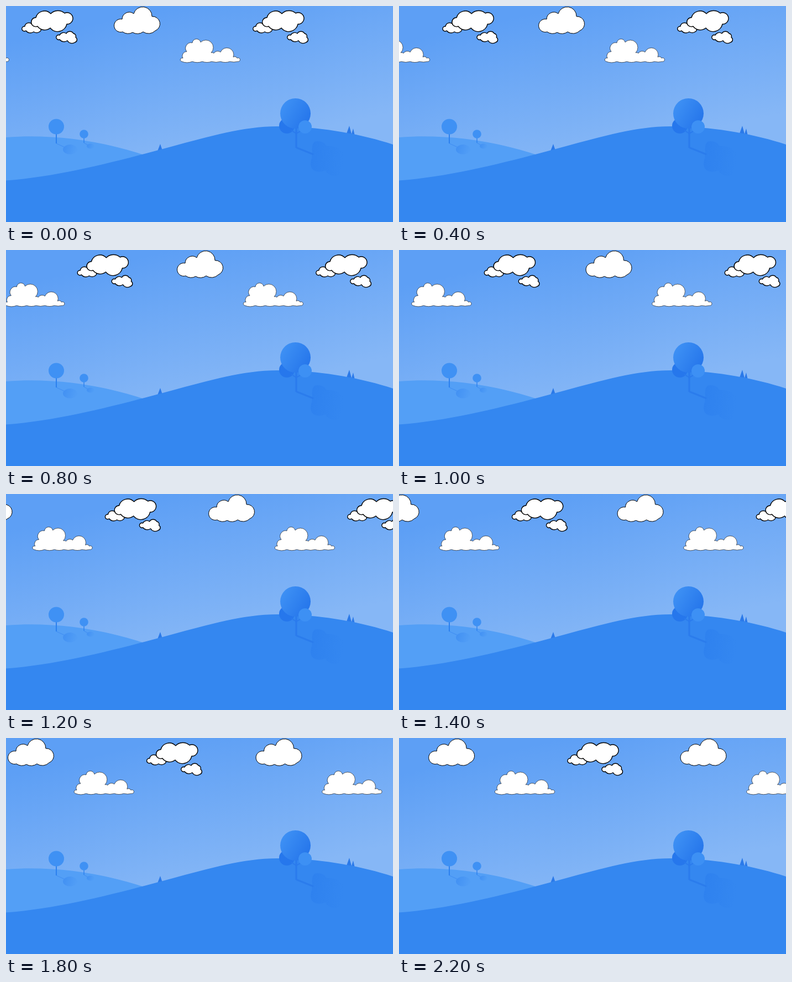
Write an HTML page that moves like this. It is 700 by 393 pixels and loops after 2.4 s.

```html
<!DOCTYPE html>
<html lang="en">
<head>
<meta charset="utf-8">
<title>Drifting clouds</title>
<style>
  html, body { margin: 0; width: 100%; height: 100%; overflow: hidden; }
  svg { display: block; width: 100vw; height: 100vh; }
</style>
</head>
<body>
<svg viewBox="0 0 700 393" preserveAspectRatio="none">
  <defs>
    <linearGradient id="sky" gradientUnits="userSpaceOnUse" x1="300" y1="0" x2="360" y2="270">
      <stop stop-color="#5d9ff5"/><stop offset="1" stop-color="#86b7f6"/>
    </linearGradient>
    <linearGradient id="crown" x1="0" y1=".2" x2="1" y2=".8">
      <stop stop-color="#3f92f5"/><stop offset="1" stop-color="#2474ea"/>
    </linearGradient>
    <linearGradient id="shade" x1="0" y1="0" x2="1" y2=".1">
      <stop stop-color="#2b7eee"/><stop offset="1" stop-color="#2b7eee" stop-opacity="0"/>
    </linearGradient>
    <linearGradient id="farShade" x1="0" y1="0" x2="1" y2=".2">
      <stop stop-color="#4190f3"/><stop offset="1" stop-color="#4190f3" stop-opacity=".1"/>
    </linearGradient>

    <g id="clouds" fill="#fff" stroke="#000" stroke-linejoin="round">
      <g stroke-width="1.4">
        <path d="M34 37A7.5 7.5 0 0 1 47 33A10 10 0 0 1 61 38A5 5 0 0 1 62 46A10 10 0 0 1 50 47A10 10 0 0 1 36 45A4.5 4.5 0 1 1 34 37Z"/>
        <path d="M54 21A16 16 0 0 1 81 14A18 18 0 0 1 106 13A10.5 10.5 0 1 1 110 33A17 17 0 0 1 80 40A16 16 0 0 1 57 37A8.3 8.3 0 1 1 54 21Z"/>
        <path d="M97 53A8 8 0 0 1 109 50A7.5 7.5 0 0 1 122 50A5 5 0 0 1 126 57A5 5 0 0 1 125 66A9.5 9.5 0 0 1 111 63A10 10 0 0 1 97 61A4.4 4.4 0 1 1 97 53Z"/>
      </g>
      <path d="M210 24A13 13 0 0 1 231 14A16.8 16.8 0 0 1 264 19A13.5 13.5 0 0 1 270 45A17 17 0 0 1 248 47A16.7 16.7 0 0 1 229 48A16 16 0 0 1 211 47A11.9 11.9 0 1 1 210 24Z"/>
      <path stroke-width=".6" d="M318 101A3.2 3.2 0 1 1 320 95A8 8 0 0 1 327 83A10 10 0 0 1 337 67A7.6 7.6 0 0 1 352 66A12.9 12.9 0 0 1 371 85A5 5 0 0 1 376 86A8 8 0 0 1 388 84A12.3 12.3 0 0 1 411 93A4.5 4.5 0 0 1 418 95A3.4 3.4 0 1 1 419 101A25 25 0 0 1 405 101A25 25 0 0 1 388 101A25 25 0 0 1 372 101A25 25 0 0 1 355 101A25 25 0 0 1 337 101A25 25 0 0 1 318 101Z"/>
    </g>
  </defs>

  <path fill="url(#sky)" d="M0 0H700V393H0Z"/>
  <use id="near" href="#clouds"/>
  <use id="far" href="#clouds"/>

  <path fill="#539ff6" d="M0 239C80 233 165 243 250 271V330H0Z"/>
  <ellipse cx="116" cy="261" rx="13" ry="9" fill="url(#farShade)"/>
  <ellipse cx="153" cy="255" rx="7" ry="4.5" fill="url(#farShade)"/>
  <path fill="none" stroke="#4391f3" stroke-width="1.3" d="M91 250L106 257M141 249L148 253"/>
  <path stroke="#2b80ee" stroke-width="2" d="M91 230V250"/>
  <path stroke="#2b80ee" stroke-width="1.4" d="M141 239V249"/>
  <g fill="#3f91f4">
    <circle cx="91" cy="219.5" r="14"/>
    <circle cx="141" cy="233" r="7.8"/>
  </g>

  <path fill="#2a79e9" d="M274 264L279 251L283 263ZM616 232L621 218L625 233ZM625 233L628 223L630.500 234Z"/>
  <path fill="#3487f0" d="M0 317.500C95 310 190 285 280 261C355 241 425 219 490 219C565 219 640 232 700 252V393H0Z"/>

  <path fill="url(#shade)" opacity=".65" d="M554 268C552 252 556 244 566 246C574 247 577 250 580 255C596 254 612 261 613 277C614 296 608 310 594 309C586 309 581 304 577 299C565 305 552 300 551 289C551 281 554 275 554 268Z"/>
  <path fill="none" stroke="#2b7cec" stroke-width="3" d="M525 257.500L556 270"/>
  <circle cx="508" cy="218" r="14" fill="#2677ec"/>
  <circle cx="523.500" cy="195.500" r="27.500" fill="url(#crown)"/>
  <circle cx="541" cy="220" r="12" fill="#3d90f4"/>
  <path fill="none" stroke="#2b7bed" stroke-width="3.400" d="M525 222V258"/>
  <path fill="none" stroke="#2b7bed" stroke-width="2" d="M516 226L525 232L532 228"/>
</svg>
<script>
  const near = document.getElementById('near');
  const far = document.getElementById('far');
  const shift = (el, x) => el.setAttribute('x', x);

  // Both banks advance in discrete 200 ms steps.
  function draw() {
    const step = Math.floor(performance.now() % 2400 / 200);
    shift(near, 418 + 28.5 * step);
    shift(far, 25.1 * step);
    // The far bank holds the wide clouds one span to the left.
    for (const [i, el] of wide.entries()) {
      shift(el, i ? 28.5 * step : 25.1 * step - 418);
    }
    requestAnimationFrame(draw);
  }

  // The triple cloud and the wide clouds start a span apart.
  const bank = document.getElementById('clouds');
  const trio = bank.firstElementChild;
  trio.id = 'trio';
  const rest = bank.cloneNode(true);
  rest.id = 'rest';
  rest.firstElementChild.remove();
  bank.replaceChildren(trio);
  bank.after(rest);
  const wide = [0, 1].map(() => {
    const el = near.cloneNode();
    el.removeAttribute('id');
    el.setAttribute('href', '#rest');
    far.after(el);
    return el;
  });
  draw();
</script>
</body>
</html>
```
